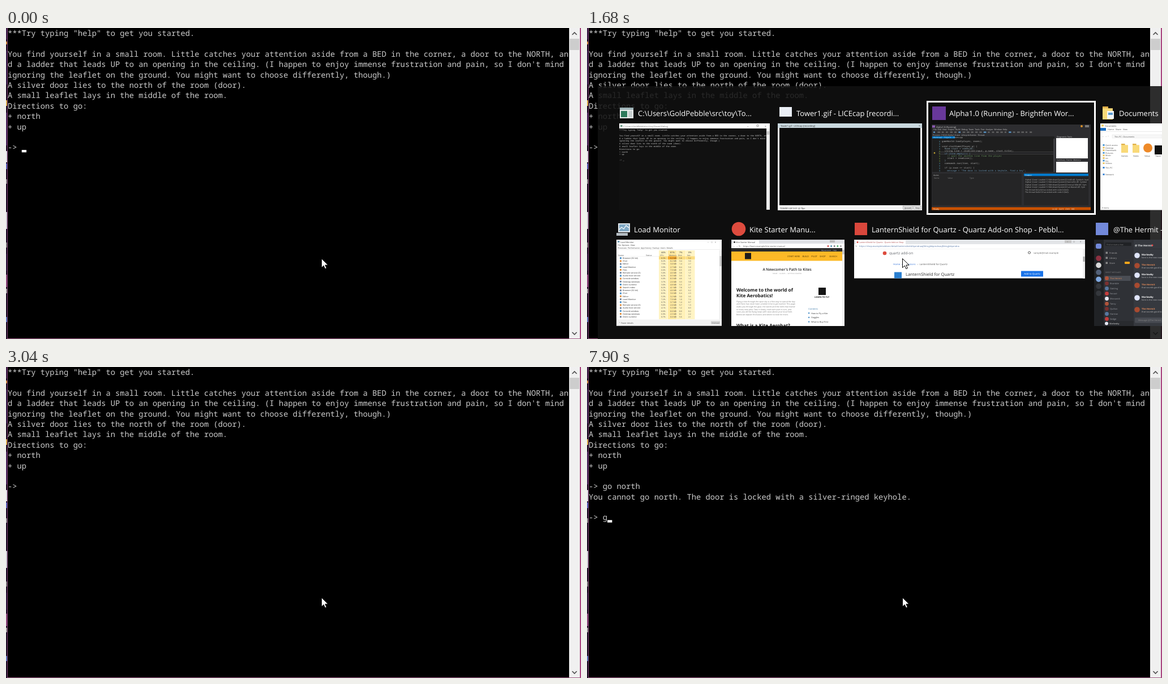
An HTML page for the animation above (8 s loop, 1016x551 px).

```html
<!DOCTYPE html>
<html lang="en">
<head>
<meta charset="utf-8">
<title>Text adventure</title>
<style>
html, body { margin: 0; width: 100%; height: 100%; overflow: hidden; background: #000; }
svg { display: block; width: 1016px; height: 551px; text-rendering: geometricPrecision; }
text { white-space: pre; font-family: "Open Sans", "Noto Sans", sans-serif; }
.mono { font-family: "Noto Sans Mono", "DejaVu Sans Mono", monospace; }
.bold { font-weight: 700; }
</style>
</head>
<body>
<svg id="stage" viewBox="0 0 1016 551" xmlns="http://www.w3.org/2000/svg"></svg>
<script>
const LOOP = 8000, COL = 8.267, ROW = 18.36;
const ink = '#cccccc';

const rect = (x, y, w, h, fill, more = '') =>
  `<rect x="${x}" y="${y}" width="${w}" height="${h}" fill="${fill}" ${more}/>`;
const dot = (x, y, r, fill, more = '') => `<circle cx="${x}" cy="${y}" r="${r}" fill="${fill}" ${more}/>`;
const path = (d, more) => `<path d="${d}" ${more}/>`;
const text = (x, y, s, size, fill, more = '') =>
  `<text x="${x}" y="${y}" font-size="${size}" fill="${fill}" ${more}>${s}</text>`;
const column = (x, y, step, list, size, fill, more) =>
  list.map((s, i) => text(x, y + i * step, s, size, fill, more)).join('');
const times = (n, fn) => Array.from({ length: n }, (_, i) => fn(i)).join('');
const clip = (id, x, y, w, h, body) =>
  `<clipPath id="${id}">${rect(x, y, w, h, '#000')}</clipPath><g clip-path="url(#${id})">${body}</g>`;

let seed = 7;
const rand = () => (seed = (seed * 16807) % 2147483647) / 2147483647;

// Terminal
const story = [
  '***Try typing "help" to get you started.', '',
  'You find yourself in a small room. Little catches your attention aside from a BED in the corner, a door to the NORTH, an',
  "d a ladder that leads UP to an opening in the ceiling. (I happen to enjoy immense frustration and pain, so I don't mind ",
  'ignoring the leaflet on the ground. You might want to choose differently, though.)',
  'A silver door lies to the north of the room (door).',
  'A small leaflet lays in the middle of the room.',
  'Directions to go:', '+ north', '+ up', ''
];
const reply = 'You cannot go north. The door is locked with a silver-ringed keyhole.';
const termLine = (row, s, id = '') =>
  text(3, (14.3 + row * ROW).toFixed(2), s, 13.78, ink, `class="mono" ${id}`);
const storyText = story.map((s, i) => termLine(i, s)).join('');

function terminal() {
  const behind = [[0, 20, '#3b2148'], [24, 5, '#c98a3c'], [40, 60, '#33204a'], [128, 10, '#d8b04a'],
    [150, 58, '#4a2a5c'], [218, 20, '#d8d8e0'], [240, 10, '#5560b8'], [268, 8, '#888'],
    [326, 30, '#c9c9d2'], [380, 9, '#777'], [400, 30, '#2c1a3c'], [437, 22, '#8a4a7a'],
    [462, 8, '#999'], [512, 9, '#5a78c0']];
  return rect(0, 0, 1016, 551, '#000') + rect(0, 0, 2, 551, '#1d1226') +
    behind.map(([y, h, c]) => rect(0, y, 2, h, c)).join('') +
    rect(2, 0, 1, 551, '#7d3a6c') + storyText +
    rect(995, 0, 19, 550, '#f0f0f0') + rect(996, 19, 17, 20, '#cdcdcd') +
    path('M1000.5 12l4-4 4 4M1000.5 539l4 4 4-4', 'fill="none" stroke="#505050" stroke-width="1.7"') +
    rect(1014, 0, 2, 551, '#a8447f') + rect(2, 550, 1014, 1, '#a05a86') +
    termLine(11, '-> ', 'id="first"') + termLine(12, '', 'id="answer"') +
    termLine(14, '', 'id="second"') + rect(27.8, 216, 8.3, 4.3, '#fff', 'id="caret"');
}

// Window switcher: thumbnails
function consoleThumb() {
  return rect(57, 169, 266, 153.5, '#111', 'id="shade"') + rect(57, 169, 266, 9, '#fff') +
    rect(59, 172, 3.5, 3, '#6b9a86') +
    text(64, 175.5, 'C:\\Users\\GoldPebble\\src\\toy\\Tower\\Debug', 4, '#777') +
    text(283, 175.5, '–', 5, '#555') + rect(300, 171.5, 3, 3, 'none', 'stroke="#666" stroke-width=".6"') +
    text(314, 175.5, '×', 5, '#555') +
    rect(317, 178, 6, 144, '#ededed') + rect(317.5, 183, 5, 6, '#c8c8c8') +
    `<g transform="translate(56.3 178.4) scale(.262)">${storyText}${termLine(11, '-> _')}</g>`;
}

function recorderThumb() {
  return rect(337, 169, 255, 154, '#f4f4f4') + rect(337, 169, 255, 8, '#c9d8de') +
    text(342, 175, 'Tower1.gif - LICEcap [recording]', 4.2, '#333') +
    text(586, 175, '×', 5, '#333') + rect(340, 177, 249, 137, '#0c0c0c') +
    text(341, 320.5, '', 3.9, '#333', 'id="timer"') +
    rect(558.5, 315.5, 17, 6, '#e4e4e4', 'stroke="#888" stroke-width=".5"') +
    rect(577, 315.5, 13, 6, '#e4e4e4', 'stroke="#888" stroke-width=".5"') +
    text(561, 320, '[pause]', 3.6, '#222') + text(580, 320, 'Stop', 3.6, '#222');
}

function editorThumb() {
  const code = ['gameWorld.load(player, rooms);', '', 'void startGame(Player p) {', '  Room start = rooms[0];',
    '  string line = readLine(input, p.name, start.title);', '  if (line.empty()) {',
    '    // wait for another line from the player', '    start = readLine();', '  }',
    '  commands.run(line, start);', '', '  if (p.room == start) {',
    '    message = "The door is locked with a keyhole, find a key";'];
  const tint = ['#b4b4b4', '#8fb0c0', '#b4b4b4', '#8fa8b4', '#a8a8a8', '#6a94b4', '#6a9460'];
  return rect(609, 171, 281, 151.5, '#2d2d30') + rect(610, 172.5, 5, 4, '#8a5ab0') +
    text(617, 176.5, 'Alpha1.0 (Running)', 4, '#ccc') + dot(874, 174, 2, '#d8902a') + rect(880, 172, 7, 4, '#777') +
    text(612, 181, 'File  Edit  View  Project  Build  Debug  Team  Tools  Test  Analyze  Window  Help', 3.6, '#ccc') +
    times(24, i => rect(612 + i * 7.4, 183.5, 3 + rand() * 2, 2.2, i % 6 ? '#666' : '#5a9bd0')) +
    text(611, 191, 'Process: [1024] Alpha1.0.exe   Lifecycle Events   Thread:', 3.6, '#bbb') +
    rect(610, 192, 216, 63, '#1e1e1e') + rect(610, 192, 40, 3.6, '#007acc') +
    text(612, 195, 'World.cpp     Player.h     Rooms.cpp', 3.2, '#ddd') +
    rect(622, 219.2, 203, 4.4, '#222224', 'stroke="#666" stroke-width=".4"') + dot(614, 221.4, 1.3, '#c0a030') +
    code.map((s, i) => text(627, 202 + i * 4.3, s, 4, tint[i % 7], 'class="mono"')).join('') +
    times(13, i => rect(622.5, 200 + i * 4.3, 1.2, 2.5, i > 3 && i < 9 ? '#577430' : '#3d6a7a')) +
    rect(824, 196, 3, 59, '#3e3e42') + text(830, 193.5, 'Diagnostic Tools', 3.6, '#ccc') +
    rect(829, 195, 56, 36, '#fff') + text(830, 235, 'Summary  Events  Memory', 3.4, '#ccc') +
    rect(829, 237, 56, 19, '#fff') +
    rect(610, 258, 158, 56, '#252526') + text(612, 262, 'Autos', 3.6, '#ccc') +
    text(613, 266.5, 'Name                 Value                                  Type', 3.4, '#888') +
    rect(772, 258, 114, 4.5, '#007acc') + text(774, 261.7, 'Output', 3.5, '#fff') +
    rect(772, 262.5, 114, 51.5, '#252526') +
    column(774, 270, 4.4, ["'Alpha1.0.exe': Loaded 'C:\\Windows\\System32\\ntdll.dll'. Symbols load",
      "'Alpha1.0.exe': Loaded 'C:\\Windows\\System32\\kernel32.dll'. Symbol",
      "'Alpha1.0.exe': Loaded 'C:\\Windows\\System32\\msvcp140d.dll'. Sym",
      "'Alpha1.0.exe': Loaded 'C:\\Windows\\System32\\ucrtbased.dll'. Sym",
      'The thread 0x1a34 has exited with code 0 (0x0).',
      'The thread 0x2b10 has exited with code 0 (0x0).'], 3.5, '#b8b8b8') +
    rect(609, 317.5, 281, 5, '#ca5100') + text(612, 321.5, 'Ready', 3.5, '#fff') +
    text(822, 321.5, 'Ln 42    Col 9    Ch 9    INS', 3.4, '#fff');
}

const folder = (x, y, w, h) =>
  rect(x, y, w * .55, h, '#e0b04a') + rect(x, y + h * .14, w, h * .86, '#f9d978');

function filesThumb() {
  return rect(907, 169, 109, 153.5, '#fff') + rect(909, 171, 4, 3.5, '#f0cd68') +
    text(915, 175, 'Documents', 3.8, '#444') + rect(907, 177, 10, 5, '#1a6fc4') +
    text(920, 181, 'Home   Share   View', 3.8, '#555') + rect(907, 183, 109, .6, '#ddd') +
    text(910, 193, '← → ↑', 4, '#777') + rect(928, 189, 88, 6, '#f7f7f7', 'stroke="#ddd" stroke-width=".4"') +
    text(932, 193.5, 'This PC › Documents', 3.7, '#555') +
    column(916, 209, 4.6, ['Quick access', 'Desktop', 'Downloads', 'Pictures', 'Music', 'src', 'toy', 'Videos'], 3.7, '#555') +
    times(8, i => rect(911.5, 206 + i * 4.6, 3, 2.8, i % 3 ? '#e8bd55' : '#3a8ed0')) +
    rect(911.5, 246, 3, 2.8, '#2a7ad0') + text(916, 249, 'This PC', 3.7, '#555') +
    rect(911.5, 258, 3, 2.8, '#2a7ad0') + text(916, 261, 'Network', 3.7, '#555') +
    folder(944, 205, 12, 16) + folder(964, 205, 12, 16) + dot(991, 212.5, 8, '#ee8a28') +
    rect(1003, 208, 13, 16, '#111') +
    text(944, 228, 'Games', 3.6, '#444') + text(965, 228, 'Notes', 3.6, '#444') +
    text(985, 228, 'Setup', 3.6, '#444') + text(1004, 228, 'Tower', 3.6, '#444') +
    text(910, 320, '9 items', 3.6, '#555');
}

function loadThumb() {
  const apps = ['Browser (32 bit)', 'Chat', 'Editor', 'Load Monitor', 'Files', 'Remote service (3)',
    'Audio host service', 'Console window', 'Desktop windows', 'Client runtime', 'Search index'];
  const heat = ['#fff4c4', '#ffe9a0', '#fff1b8', '#fff4c4'];
  return rect(52, 375, 186, 152.5, '#fff') + rect(54, 377, 3.5, 3, '#7aa3b8') +
    text(59, 380.5, 'Load Monitor', 3.8, '#444') + text(213, 380.5, '–    □    ×', 4, '#555') +
    text(54, 385.5, 'File  Options  View', 3.6, '#333') +
    text(54, 390.5, 'Processes  Performance  App history  Startup  Users  Details', 3.5, '#444') +
    rect(52, 392, 186, .5, '#ddd') +
    times(4, i => rect(127 + i * 16, 394, 15.5, 122, heat[i]) +
      rect(127 + i * 16, 404.5, 15.5, 5.5, i === 1 ? '#f7a92c' : '#fbdc80') +
      text(131 + i * 16, 398.5, ['44%', '81%', '7%', '0%'][i], 4, '#333') +
      text(129 + i * 16, 403.5, ['CPU', 'Memory', 'Disk', 'Net'][i], 3.4, '#555')) +
    text(55, 403.5, 'Name', 3.6, '#555') + text(104, 403.5, 'Status', 3.6, '#555') + rect(52, 404.5, 75, .4, '#ddd') +
    times(21, i => {
      const y = 409 + i * 5.2;
      return rect(58, y - 2.8, 3, 3, ['#4a90c8', '#e09040', '#7888a0'][i % 3]) +
        text(54, y, '›', 4, '#888') + text(63, y, apps[i % apps.length], 3.7, '#333') +
        times(4, k => text(131 + k * 16, y, (rand() * 9).toFixed(1) + ['%', ' MB', '', ''][k], 3.4, '#444'));
    }) +
    rect(234, 394, 4, 122, '#eee') + rect(234.5, 404, 3, 18, '#c4c4c4') +
    rect(52, 516.5, 186, 11, '#f2f2f2') + text(56, 523.5, '⌃ Fewer details', 3.6, '#444') +
    rect(219, 519.5, 16, 5, '#cfcfcf') + text(221, 523.5, 'End task', 3.2, '#777');
}

function guideThumb() {
  return rect(255, 375, 200, 153, '#fff') + rect(255, 375, 200, 7, '#dfe1e5') + rect(258, 376.5, 46, 6, '#fff') +
    text(263, 381, 'Kite Starter Manual', 3.8, '#444') + dot(260.5, 379.5, 1.4, '#222') +
    rect(429, 376, 9, 4, '#bbb') + text(258, 388, '← → ↻', 4, '#666') +
    text(276, 388, 'https://learn.example/kite-starter-manual', 3.8, '#555') +
    times(5, i => dot(426 + i * 5.6, 386.5, 1.4, ['#c44', '#48a', '#777', '#4a6', '#999'][i])) +
    rect(255, 390, 196, 6, '#292929') + text(414, 394.6, 'My account    Help', 3.2, '#ccc') +
    rect(255, 396, 196, 16.5, '#fdb927') + rect(279, 398.5, 11, 11, '#1c1c1c') +
    text(354, 406, 'START HERE    BUILD    PILOT    SHOP', 4, '#4a3608') + text(428, 406, 'SEARCH', 3.8, '#4a3608') +
    text(353.5, 430, "A Newcomer's Path to Kites", 6.5, '#222', 'text-anchor="middle" font-weight="600"') +
    text(353.5, 435.7, 'HOME  ›  GUIDES  ›  GETTING STARTED', 2.9, '#999', 'text-anchor="middle"') +
    column(264, 467, 10.2, ['Welcome to the world of', 'Kite Aerobatics!'], 8.2, '#181818', 'class="bold"') +
    column(264, 485.5, 4.7, ['Flying a kite through the open sky is a fine way to spend the day',
      'and there has never been a better time to get started. This page',
      'walks you through the gear, the words and the skills that matter',
      'to every new pilot. Take it slowly, read each part in turn, and',
      'soon you will be flying loops with ease above your local field.',
      'Below we explain the basics and where to look for more.'], 3.5, '#777') +
    rect(409, 460, 13, 13, '#151515') + text(402, 478, 'LEARN TO FLY', 3.8, '#222', 'class="bold"') +
    text(391, 498.5, 'Contents', 4, '#3b78a8') +
    column(396, 506.5, 7.7, ['How to Fly a Kite', 'Goggles', 'What to Buy First'], 3.8, '#333') +
    times(3, i => rect(391, 504 + i * 7.7, 2.2, 2.2, '#4a90c8')) +
    text(264, 529.5, 'What is a Kite Aerobat?', 8.2, '#181818', 'class="bold"') +
    rect(451, 391, 4, 137, '#f1f1f1') + rect(451.4, 393, 3.2, 8, '#bdbdbd');
}

function shopThumb() {
  return rect(472, 375, 408, 68.5, '#fff') + rect(472, 375, 408, 8, '#e3e5e8') + rect(475, 376.5, 88, 7, '#fff') +
    text(481, 381, 'LanternShield for Quartz - Quartz Add-on Shop', 3.6, '#b04a4a') + dot(478, 379.6, 1.5, '#d9534a') +
    rect(844, 376, 12, 5, '#c6c6c6') + text(848, 380, '–         □         ×', 4, '#333') +
    text(481, 388, 'https://shop.example/addons/detail/lanternshield/kpmdnaojfbhicglekpmdnaojfbhicglekpmdna', 4, '#5878a8') +
    text(474, 388, '↻', 4, '#777') +
    rect(472, 391, 404, .5, '#e4e4e4') + dot(526, 399, 3.3, '#dd4b3e') +
    text(534, 401.3, 'quartz add-on', 6.4, '#5f6368') + dot(781.5, 398, 2, 'none', 'stroke="#555"') +
    text(789, 400, 'sample@mail.example', 4.2, '#666') +
    text(541, 419.5, 'Home  ›  Extensions', 4.3, '#3b78d8') + text(584, 419.5, '›  LanternShield for Quartz', 4.3, '#555') +
    rect(543, 432.5, 13, 11, '#2a7fd0') + text(563, 438.5, 'LanternShield for Quartz', 7.5, '#333') +
    rect(767, 430.5, 39, 10, '#1a73e8') + text(786.5, 437, 'Add to Quartz', 4.4, '#fff', 'text-anchor="middle"') +
    rect(876, 391, 4, 52.5, '#f1f1f1') + rect(876.5, 405, 3, 9, '#aaa');
}

function chatThumb() {
  const hues = ['#e6e8f5', '#b0533a', '#7a3030', '#5878a0', '#c43c3c'];
  const people = ['The Hermit', 'Bramble', 'Oakling', 'Fennel', 'Mosswick', 'Tansy', 'Quillon', 'Harrow', 'Sedge'];
  const says = [[403, 'Marlowby', 0], [421, 'The Hermit', 1], [438, 'Marlowby', 0],
    [456, 'The Hermit', 1], [478, 'Marlowby', 0], [499, 'The Hermit', 1]];
  return rect(896, 375, 120, 153.5, '#36393f') + rect(896, 375, 17, 153.5, '#202225') + rect(913, 375, 53, 153.5, '#2f3136') +
    rect(899, 382, 10, 9, '#7289da', 'rx="3"') +
    times(6, i => dot(904, 408 + i * 12.4, 4.8, ['#8c3040', '#d8d8d8', '#526078', '#7fa8e0', '#34373c', '#34373c'][i])) +
    rect(916, 380, 46, 6, '#202225', 'rx="1"') + text(918, 384.6, 'Find or start a chat', 3.4, '#888') +
    column(923, 400, 9, ['Friends', 'Library', 'Store'], 4, '#aaa') +
    times(3, i => rect(916.5, 396.5 + i * 9, 3.5, 3.5, '#888')) + rect(950, 414, 9, 4, '#faa61a', 'rx="1"') +
    text(916, 434, 'DIRECT MESSAGES', 3.2, '#888') + rect(914.5, 439, 46, 9, '#4a4d54') +
    people.map((s, i) => dot(918.5, 443.5 + i * 9, 3.4, hues[(i + 1) % 5]) +
      text(924, 445 + i * 9, s, 4, i ? '#9a9da3' : '#e08a5a')).join('') +
    rect(913, 519, 53, 9.5, '#292b2f') + dot(918, 523.5, 3, '#e6e8f5') + text(923, 525, 'Marlowby', 3.8, '#ddd') +
    text(968, 386.5, '@ The Hermit', 4.6, '#eee', 'class="bold"') + dot(999, 385, 1.4, '#f04747') +
    rect(966, 391, 50, .5, '#25272b') +
    says.map(([y, name, h]) => dot(972, y, 4.8, h ? '#a84a30' : '#dfe4fb') +
      text(980, y, name, 4.2, h ? '#e08a5a' : '#fff', 'class="bold"') +
      text(980, y + 5, h ? 'that sounds good to me' : 'here is the new room', 3.8, '#b5b7ba')).join('') +
    rect(968, 513, 48, 9.5, '#484b52', 'rx="1.5"') + text(974, 519.3, 'Message @The Hermit', 3.9, '#888');
}

// Switcher icons
const windowIcon = rect(58, 141, 24, 19, '#e8ecec') + rect(58, 141, 24, 4, '#9fb4b8') +
  rect(60, 147, 11, 11, '#2e7a5c') + rect(73, 147, 7, 11, '#c8d0d0');
const docIcon = folder(911, 139, 18, 23) + rect(919, 147, 12, 14, '#f2f5f8') + rect(921, 150, 8, 4, '#5a9bd0');
const monitorIcon = rect(55, 346, 21, 16, '#dfe5ea') + rect(57, 348, 17, 12, '#7fa8c4') +
  path('M57 357l4-4 4 3 4-6 5 4', 'fill="none" stroke="#fff" stroke-width="1.2"') + rect(52, 363, 20, 5, '#b4bcc2');

// left, right, row, title x, title, icon, thumbnail
const windows = [
  [50, 330, 0, 90, 'C:\\Users\\GoldPebble\\src\\toy\\To...', windowIcon, consoleThumb],
  [330, 600, 0, 370, 'Tower1.gif - LICEcap [recordi...', rect(340, 140, 22, 17, '#e9edf4'), recorderThumb],
  [600, 899, 0, 640, 'Alpha1.0 (Running) - Brightfen Wor...', rect(610, 139, 24, 24, '#68389a'), editorThumb],
  [899, 1040, 0, 940, 'Documents', docIcon, filesThumb],
  [43, 247, 1, 83, 'Load Monitor', monitorIcon, loadThumb],
  [247, 463, 1, 287, 'Kite Starter Manu...', dot(268, 356, 12.3, '#dd4b3e'), guideThumb],
  [463, 888, 1, 503, 'LanternShield for Quartz - Quartz Add-on Shop - Pebbl...', rect(473, 345, 22, 22, '#d9473c'), shopThumb],
  [888, 1040, 1, 930, '@The Hermit - ', rect(899, 345, 22, 22, '#7289da'), chatThumb]
];

function switcher() {
  return rect(19, 103, 997, 448, '#111', 'fill-opacity=".87"') +
    windows.map(([left, right, row, tx, title, icon, thumb], i) =>
      icon + text(tx, row ? 361.6 : 155.8, title, 13, '#fff') +
      clip('win' + i, left, row ? 375 : 169, right - left, row ? 153 : 154, thumb())).join('') +
    rect(0, 0, 0, 0, 'none', 'id="frame" stroke="#fff" stroke-width="3"');
}

const pointer = path('M557.5 408.5v16.2l3.8-3.6 2.5 5.6 2.6-1.2-2.5-5.4h5.2z',
  'fill="#fff" stroke="#000" stroke-width="1"');

const stage = document.getElementById('stage');
stage.innerHTML = terminal() + `<g id="switcher">${switcher()}</g>` + pointer;
const [first, answer, second, caret, overlay, frame, timer, shade] =
  ['first', 'answer', 'second', 'caret', 'switcher', 'frame', 'timer', 'shade']
    .map(id => document.getElementById(id));

// time, typed text, caret shown
const typing = [
  [0, '', 1], [140, '', 0], [3600, '', 1], [4160, '', 0], [4560, '', 1], [4990, '', 0],
  [5110, 'g', 1], [5240, 'go', 1], [5390, 'go ', 1], [5540, 'go no', 1], [5690, 'go no', 0],
  [6220, 'go no', 1], [6650, 'go nort', 0], [6800, 'go north', 0], [6920, 'go north\n', 0],
  [7040, 'go north\n', 1], [7750, 'go north\n', 0], [7900, 'go north\ng', 1]
];
const OPEN = 260, CLOSE = 3040;
// time, selected window; -1 lies beyond the right edge
const picks = [[0, 1], [1680, 2], [1840, 3], [1980, 4], [2100, 5],
  [2370, 6], [2490, 7], [2610, -1], [2890, 0]];
const clock = [[0, '0:00'], [540, '0:00 @ 7fps'], [970, '0:00 @ 8fps'], [1530, '0:01 @ 7fps'],
  [2370, '0:02 @ 8fps']];
const at = (list, t) => list.filter(e => e[0] <= t).pop();
const set = (node, attrs) => {
  for (const key in attrs) node.setAttribute(key, attrs[key]);
};

function draw(t) {
  const [, typed, blink] = at(typing, t);
  const [command, next] = typed.split('\n');
  const entered = next !== undefined;
  first.textContent = '-> ' + command;
  answer.textContent = entered ? reply : '';
  second.textContent = entered ? '-> ' + next : '';
  set(caret, {
    x: 3 + COL * (3 + (entered ? next : command).length),
    y: entered ? 271.2 : 216,
    visibility: blink ? 'visible' : 'hidden'
  });

  set(overlay, { display: t >= OPEN && t < CLOSE ? 'inline' : 'none' });
  timer.textContent = 'TOWER1.GIF ' + at(clock, t)[1];
  const pick = at(picks, t)[1], win = windows[pick];
  set(shade, { fill: pick === 0 ? '#000' : '#111' });
  set(frame, { display: win ? 'inline' : 'none' });
  if (win) {
    const [left, right, row] = win;
    set(frame, { x: left + 1.5, y: row ? 336.5 : 130.5, width: right - left - 3, height: row ? 198 : 199 });
  }
}

const start = performance.now();
function tick() {
  draw((performance.now() - start) % LOOP);
  requestAnimationFrame(tick);
}
tick();
</script>
</body>
</html>
```
